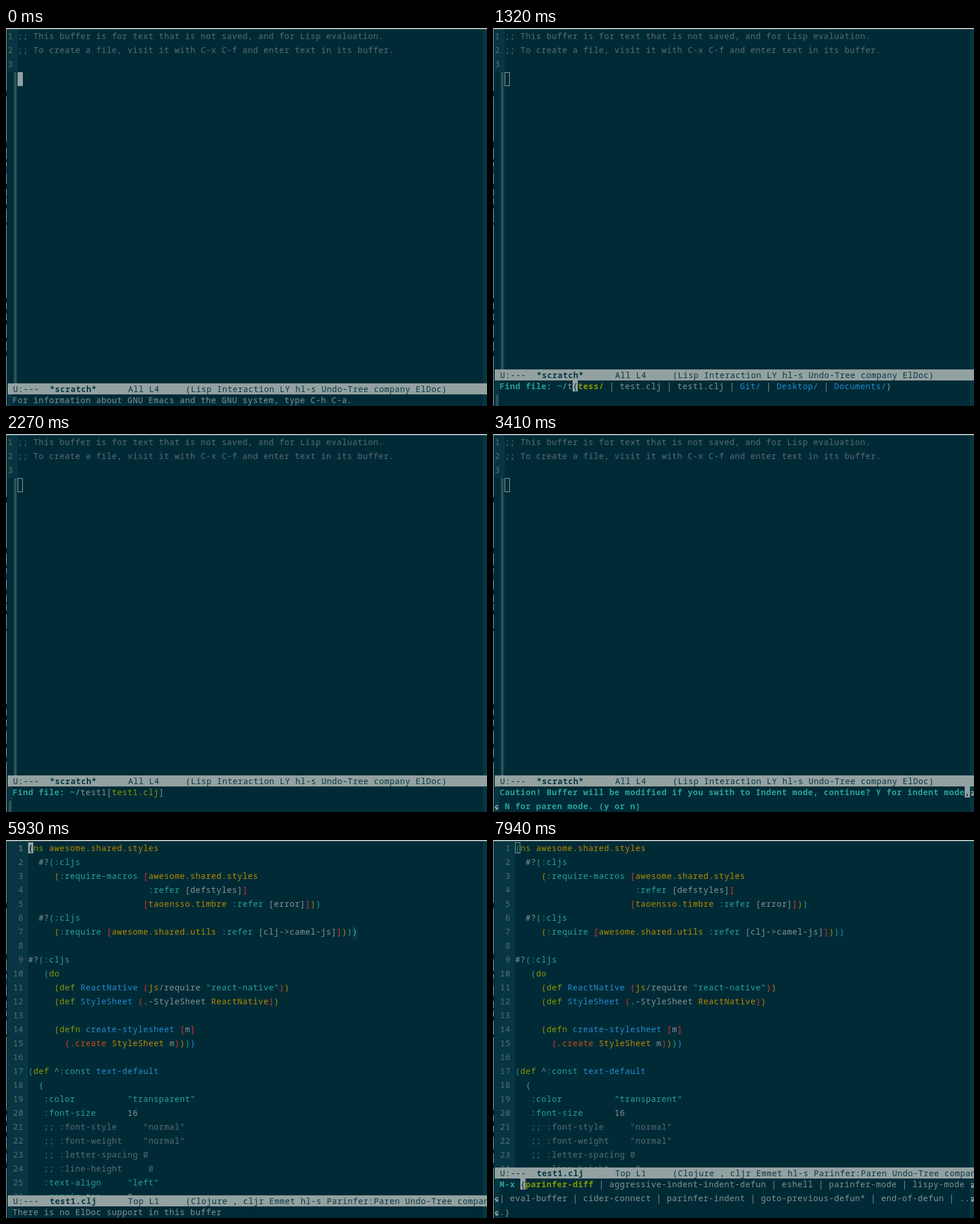
Animation of 828 by 651 pixels, one loop 8000 ms. Source, as an HTML page with a canvas:

```html
<!DOCTYPE html>
<html lang="en">
<head>
<meta charset="utf-8">
<title>Editor session</title>
<style>
html, body { margin: 0; width: 100%; height: 100%; overflow: hidden; background: #002b36; }
canvas { display: block; }
</style>
</head>
<body>
<canvas id="stage" width="828" height="651"></canvas>
<script>
const ctx = document.getElementById('stage').getContext('2d');
const W = 828, H = 651, CELL = 9, ROW = 24, LINE = 19, LEFT = 3, RIGHT = 821, TOP = 4, COLS = 90;
const LOOP = 8000;
const FONT = '14px "Noto Sans Mono", "DejaVu Sans Mono", monospace';
const C = {
  bg: '#002b36', edge: '#073642', dim: '#586e75', text: '#839496', bar: '#93a1a1',
  yellow: '#b58900', orange: '#cb4b16', red: '#dc322f', blue: '#268bd2', cyan: '#2aa198', green: '#859900'
};

function rect(x, y, w, h, color) {
  ctx.fillStyle = color;
  ctx.fillRect(x, y, w, h);
}

// Each character is centred in its terminal cell.
function type(text, x, top, color, bold) {
  ctx.font = (bold ? 'bold ' : '') + FONT;
  ctx.textAlign = 'center';
  ctx.fillStyle = color;
  [...text].forEach((ch, i) => {
    if (ch !== ' ') ctx.fillText(ch, x + (i + 0.5) * CELL, top + 15);
  });
}

function hollow(x, y, h) {
  ctx.strokeStyle = C.bar;
  ctx.lineWidth = 1;
  ctx.strokeRect(x + 0.5, y + 0.5, CELL - 1, h - 1);
}

function block(ch, x, y, h, bold) {
  rect(x, y, CELL, h, C.bar);
  type(ch, x, y, C.bg, bold);
}

function emptyLines(x, from, to) {
  for (let y = from + 1; y < to; y += 2) rect(x + 2, y, 4, 1, C.dim);
}

// Curled arrow that marks a wrapped line in the fringe.
function curl(x, top, flip) {
  ctx.save();
  ctx.translate(flip ? x + 8 : x, top + 8);
  if (flip) ctx.scale(-1, 1);
  const parts = [[2, 0, 4, 1], [1, 1, 5, 1], [0, 2, 2, 3], [2, 3, 1, 1], [5, 3, 1, 1],
    [2, 4, 4, 1], [1, 5, 5, 1], [2, 6, 4, 1], [1, 7, 5, 1]];
  for (const p of parts) rect(...p, C.text);
  ctx.restore();
}

function backdrop() {
  rect(0, 0, W, H, C.bg);
  rect(0, 0, W, 2, '#b9c2c2');
  rect(0, 0, 1, H, '#a9b1b1');
  for (const [y, h] of [[108, 10], [196, 10], [226, 5], [268, 9], [290, 3], [304, 7], [335, 4],
    [465, 9], [484, 8], [503, 8], [533, 7], [556, 9]]) rect(0, y, 1, h, '#10181a');
  rect(0, 239, 1, 12, '#1456a0');
  rect(LEFT, TOP - 2, 8, H, C.edge);
  rect(RIGHT, TOP - 2, W - RIGHT, H, C.edge);
}

function modeLine(top, name, place, modes) {
  rect(LEFT, top, W - LEFT, LINE, C.bar);
  type(' U:---', LEFT, top, C.edge);
  type(name, LEFT + 8 * CELL, top, C.edge, true);
  type(place + '     ' + modes, LEFT + 23 * CELL, top, C.edge);
}

// parts: [text, color, bold]; cursor: index of the covered character, or -1
function minibuffer(top, parts, cursor = -1) {
  let n = 0;
  for (const [text, color, bold] of parts) {
    for (const ch of text) {
      const x = 11 + (n % COLS) * CELL, y = top + Math.floor(n / COLS) * ROW;
      if (n === cursor) block(ch, x, y, LINE, bold);
      else type(ch, x, y, color, bold);
      n++;
    }
  }
  const last = Math.floor((n - 1) / COLS);
  for (let i = 0; i < last; i++) {
    curl(RIGHT, top + i * ROW, true);
    curl(LEFT, top + (i + 1) * ROW, false);
  }
  const next = top + (last + 1) * ROW;
  if (next < 640) emptyLines(LEFT, next, H);
}

function choices(prompt, typed, names, more, cursorOn) {
  const parts = [[prompt, C.cyan, true], [typed, C.text]];
  const single = names.length === 1;
  parts.push([single ? '[' : '{', C.text]);
  names.forEach((name, i) => {
    if (i) parts.push([' | ', C.text]);
    const color = i === 0 ? C.green : name.endsWith('/') ? C.blue : C.text;
    parts.push([name, color, i === 0 && !single]);
  });
  parts.push([(more ? ' | ...' : '') + (single ? ']' : '}'), C.text]);
  return [parts, cursorOn ? prompt.length + typed.length : -1];
}

const NOTES = [
  ';; This buffer is for text that is not saved, and for Lisp evaluation.',
  ';; To create a file, visit it with C-x C-f and enter text in its buffer.', ''
];

function scratch(barTop, cursor) {
  rect(12, TOP - 2, 8, barTop, C.edge);
  rect(11, TOP - 2, 1, 74, C.edge);
  rect(LEFT, 76, 9, barTop - 76, C.bg);
  NOTES.forEach((line, i) => {
    type(String(i + 1), LEFT, TOP + i * ROW, C.dim);
    type(line, 20, TOP + i * ROW, C.dim);
  });
  emptyLines(12, 76, barTop);
  if (cursor === 'solid') rect(20, 76, CELL, ROW, C.bar);
  if (cursor === 'hollow') hollow(20, 76, ROW);
  footer(barTop);
  modeLine(barTop, '*scratch*', 'All L4', '(Lisp Interaction LY hl-s Undo-Tree company ElDoc)');
}

function footer(top) {
  rect(LEFT, top, W - LEFT, H - top, C.bg);
  rect(LEFT, top, 8, H - top, C.edge);
  rect(RIGHT, top, W - RIGHT, H - top, C.edge);
}

const CODE = `(ns awesome.shared.styles
  #?(:cljs
     (:require-macros [awesome.shared.styles
                       :refer [defstyles]]
                      [taoensso.timbre :refer [error]]))
  #?(:cljs
     (:require [awesome.shared.utils :refer [clj->camel-js]])))

#?(:cljs
   (do
     (def ReactNative (js/require "react-native"))
     (def StyleSheet (.-StyleSheet ReactNative))

     (defn create-stylesheet [m]
       (.create StyleSheet m))))

(def ^:const text-default
  {
   :color          "transparent"
   :font-size      16
   ;; :font-style     "normal"
   ;; :font-weight    "normal"
   ;; :letter-spacing 0
   ;; :line-height     0
   :text-align     "left"
   :margin-top     0`.split('\n');

const TOKEN = /;;.*|"[^"]*"|:[\w-]+|[()[\]{}]|js(?=\/)|[^\s()[\]{}":]+/g;
const NESTING = [C.blue, C.cyan, C.yellow, C.red, C.text];

function highlight(lines) {
  const out = [];
  let depth = 0, defining = false;
  lines.forEach((line, row) => {
    for (const m of line.matchAll(TOKEN)) {
      const t = m[0];
      let color = C.text;
      if ('([{'.includes(t)) color = NESTING[depth++];
      else if (')]}'.includes(t)) color = NESTING[--depth];
      else if (t.startsWith(';;')) color = C.dim;
      else if (/^[":]/.test(t)) color = C.cyan;
      else if (/^(ns|do|defn?)$/.test(t)) color = C.green;
      else if (t === '.create') color = C.orange;
      else if (defining && t !== '^') color = C.blue;
      else if (t === 'js' || /^[A-Z]|^\w+\.\w/.test(t)) color = C.yellow;
      if (/^defn?$/.test(t)) defining = true;
      else if (color === C.blue) defining = false;
      out.push({ t, color, row, col: m.index });
    }
  });
  return out;
}
const TOKENS = highlight(CODE);

function source(barTop, cursor, paired) {
  const x0 = 38;
  rect(LEFT, TOP - 2, x0 - LEFT, barTop, C.edge);
  CODE.forEach((_, i) => {
    type(String(i + 1).padStart(3), LEFT, TOP + i * ROW, C.dim, paired && i === 0);
  });
  for (const { t, color, row, col } of TOKENS) type(t, x0 + col * CELL, TOP + row * ROW, color);
  if (paired) {
    for (const [row, col, ch] of [[0, 0, '('], [6, 62, ')']]) {
      const x = x0 + col * CELL, y = TOP + row * ROW;
      rect(x, y, CELL, row ? ROW : LINE, C.edge);
      type(ch, x, y, C.cyan, true);
    }
  }
  if (cursor === 'solid') block('(', x0, TOP, LINE, true);
  if (cursor === 'hollow') hollow(x0, TOP, LINE);
  footer(barTop);
  modeLine(barTop, 'test1.clj', 'Top L1',
    '(Clojure , cljr Emmet hl-s Parinfer:Paren Undo-Tree company ElDoc)');
}

const HOME = ['.emacs.d/', 'Applications/', 'Blog/', 'Cellar/', 'Desktop/', 'Dev/', 'Documents/',
  'Downloads/', 'Git/', 'Hadoop/', 'Library/', 'Movies/'];
const FILES = ['tess/', 'test.clj', 'test1.clj'];
const COMMANDS = ['parinfer-diff', 'aggressive-indent-indent-defun', 'eshell', 'parinfer-mode',
  'lispy-mode', 'eval-buffer', 'cider-connect', 'parinfer-indent', 'goto-previous-defun*', 'end-of-defun'];
const CAUTION = 'Caution! Buffer will be modified if you swith to Indent mode, continue? ' +
  'Y for indent mode, N for paren mode. (y or n) ';

function findFile(t) {
  const ask = (typed, names, more, on = true) => choices('Find file: ~/', typed, names, more, on);
  if (t < 1320) return ask('', HOME, true, t < 1110);
  if (t < 1400) return ask('t', [...FILES, 'Git/', 'Desktop/', 'Documents/'], false);
  if (t < 1490) return ask('te', FILES, false);
  if (t < 1550) return ask('tes', FILES, false);
  if (t < 1790) return ask('test', FILES.slice(1), false);
  return ask('test1', FILES.slice(2), false, t < 2270 || t >= 2750);
}

function draw(t) {
  backdrop();
  if (t < 630) {
    scratch(612, t < 360 ? 'solid' : 'off');
    minibuffer(631, [['For information about GNU Emacs and the GNU system, type C-h C-a.', C.text]]);
  } else if (t < 5930) {
    scratch(588, 'hollow');
    if (t < 3410) minibuffer(607, ...findFile(t));
    else if (t < 5270) minibuffer(607, [[CAUTION, C.cyan, true]], COLS - 1);
    else minibuffer(607, [[CAUTION + 'n', C.text]]);
  } else if (t < 7820) {
    const on = t < 6500 || (t >= 6980 && t < 7460);
    source(612, on ? 'solid' : 'off', true);
    minibuffer(631, [['There is no ElDoc support in this buffer', C.text]]);
  } else {
    source(564, 'hollow', t < 7940);
    minibuffer(583, ...choices('M-x ', '', COMMANDS, true, true));
  }
}

function tick() {
  draw(performance.now() % LOOP);
  requestAnimationFrame(tick);
}
tick();
</script>
</body>
</html>
```
